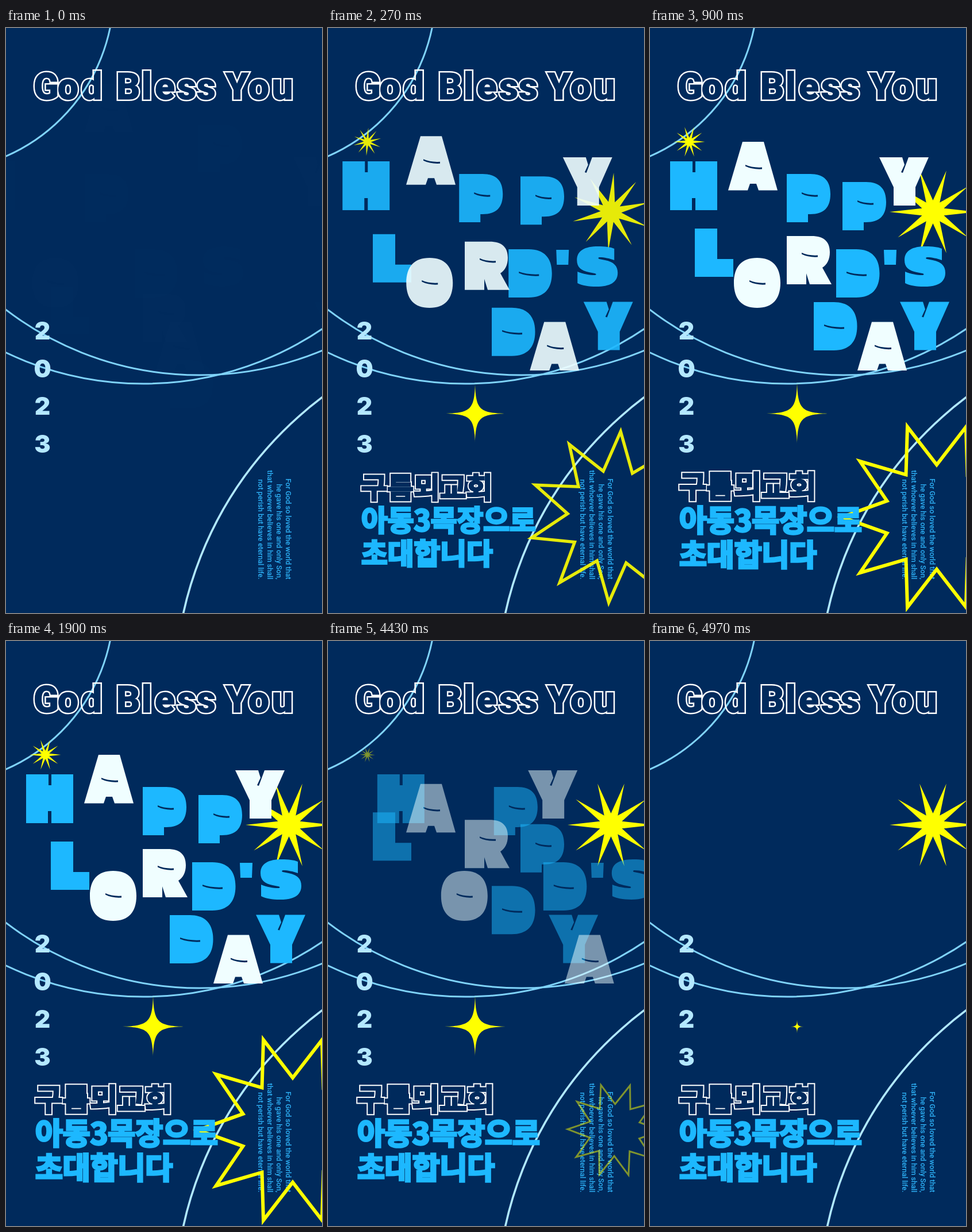
Write an HTML page that moves like this. It is 550 px wide and 1018 px high and loops after 5010 ms.

```html
<!DOCTYPE html>
<html lang="ko">
<head>
<meta charset="utf-8">
<title>Happy Lord's Day</title>
<style>
  html, body { margin: 0; width: 100%; height: 100%; overflow: hidden; background: #002a5c; }
  svg { display: block; width: 100vw; height: 100vh; }
  .title { font: 900 64px Roboto, "Liberation Sans", sans-serif; }
  .year { font: 900 42.5px Inter, Roboto, sans-serif; fill: #b4e8ff; text-anchor: middle; }
  .verse { font: 500 12.6px Roboto, "Liberation Sans", sans-serif; fill: #2db0f5; text-anchor: end; }
  .hangul { font: 900 52px "Noto Sans CJK KR", "Noto Sans CJK", sans-serif; }
  .bold { fill: #1db8ff; stroke: #1db8ff; stroke-width: 3.6; }
  .outline { fill: none; stroke: #fff; stroke-width: 6; }
  .cut { fill: #000; stroke: #000; stroke-width: 1; }
  .hangul.outline { stroke-width: 6.8; }
  .hangul.cut { stroke-width: 2.8; }
</style>
</head>
<body>
<svg viewBox="0 0 550 1018" preserveAspectRatio="none">
  <defs>
    <mask id="titleCut" maskUnits="userSpaceOnUse" x="0" y="0" width="550" height="1018">
      <rect width="550" height="1018" fill="#fff"/>
      <text class="title cut" y="124" x="48 90 131 172 192 236 259 298 332 367 382 422 463">God Bless You</text>
    </mask>
    <mask id="nameCut" maskUnits="userSpaceOnUse" x="0" y="0" width="550" height="1018">
      <rect width="550" height="1018" fill="#fff"/>
      <text class="hangul cut" x="50.5" y="816.5">구름뫼교회</text>
    </mask>
  </defs>
  <rect width="550" height="1018" fill="#002a5c"/>

  <g fill="none" stroke="#7fd3f9" stroke-width="3">
    <circle cx="-124.5" cy="-63" r="312"/>
    <circle cx="336.5" cy="49" r="555"/>
    <circle cx="239" cy="64" r="555"/>
    <circle cx="934" cy="1155" r="640" stroke="#b0e8ff" stroke-width="3.6"/>
  </g>

  <text class="title outline" mask="url(#titleCut)" y="124" x="48 90 131 172 192 236 259 298 332 367 382 422 463">God Bless You</text>

  <g class="year">
    <text x="63.5" y="542">2</text>
    <text x="63.5" y="608">0</text>
    <text x="63.5" y="673">2</text>
    <text x="63.5" y="738.5">3</text>
  </g>

  <g class="verse" transform="rotate(90)">
    <text x="959.5" y="-486.5">For God so loved the world that</text>
    <text x="959.5" y="-471">he gave his one and only Son,</text>
    <text x="959.5" y="-455">that whoever believes in him shall</text>
    <text x="959.5" y="-439">not perish but have eternal life.</text>
  </g>

  <path id="smallStar" fill="#ff0"/>
  <path id="bigStar" fill="#ff0"/>
  <path id="burst" fill="none" stroke="#ff0" stroke-width="6" stroke-miterlimit="8"/>
  <path id="spark" fill="#ff0" d="M0-53C1.5-8 8-1.5 53 0C8 1.5 1.5 8 0 53C-1.5 8-8 1.5-53 0C-8-1.5-1.5-8 0-53Z"/>
  <g id="letters" role="img" aria-label="Happy Lord's Day" fill-rule="evenodd"></g>

  <g id="invite">
    <text class="hangul outline" mask="url(#nameCut)" x="50.5" y="816.5">구름뫼교회</text>
    <text class="hangul bold" x="51" y="876">아동3목장으로</text>
    <text class="hangul bold" x="51" y="936">초대합니다</text>
  </g>
</svg>
<script>
const LOOP = 5010;
const BLUE = '#1db8ff', WHITE = '#f0feff';
const $ = id => document.getElementById(id);
const clamp = v => Math.max(0, Math.min(1, v));

function starPath(outer, inner, points = 10) {
  let d = '';
  for (let i = 0; i < points * 2; i++) {
    const a = i * Math.PI / points, r = i % 2 ? inner : outer;
    d += (i ? 'L' : 'M') + (r * Math.cos(a)).toFixed(2) + ' ' + (r * Math.sin(a)).toFixed(2);
  }
  return d + 'Z';
}

// Thin curved cut that stands in for a letter's counter.
const slit = (x, y, w) => `M${x} ${y}q${w * 0.42} 5.5 ${w} 4.5v3q${-w * 0.58} 1 ${-w}-5z`;

// Glyph shapes, each from its own top left corner.
const glyphs = {
  H: 'M0 0H39V19H44V0H82V85H44V64H38V85H0Z',
  A: 'M25 0H62L86 84.5H53L49 73H38L34 84.5H0Z' + slit(30, 40, 29),
  P: 'M0 0H41C65 0 76 12 76 35C76 58 65 70 41 70H37V84H0Z' + slit(26, 32, 28),
  Y: 'M0 0H40L44 13L38 26L41 27L51 0H86L63 52V84H25V52Z',
  L: 'M0 0H39V53H67V84H0Z',
  O: 'M40.5 0C67 0 81 15 81 43.5S67 87 40.5 87S0 72 0 43.5S14 0 40.5 0Z' + slit(27, 39, 28),
  R: 'M0 0H43C65 0 75 10 75 28C75 41 70 50 62 55L78 84H40L34 65V84H0Z' + slit(26, 29, 28),
  D: 'M0 0H35C62 0 75.5 15 75.5 42S62 84 35 84H0Z' + slit(18, 39, 35),
  "'": 'M0 0H22L21 26H1Z',
  S: 'M65 4V24C57 21 47 19 40 19C37 19 36 21 39 22L49 24C64 27 71 34 71 46C71 63 57 70 34 70C20 70 9 68 1 64V44C11 48 22 50 30 50C34 50 35 48 31 47L21 45C7 42 0 36 0 24C0 7 14 0 37 0C49 0 58 1 65 4Z'
};

// glyph, colour, x, y, travel direction
const layout = [
  ['H', BLUE, 35, 232, 1, 0],
  ['P', BLUE, 238, 254, 1, 0],
  ['P', BLUE, 335, 268, 0, 1],
  ['L', BLUE, 78, 349, 0, -1],
  ['D', BLUE, 324, 385, 1, 0],
  ["'", BLUE, 407, 386, 1, 0],
  ['S', BLUE, 443, 380, 1, 0],
  ['D', BLUE, 285, 477, 0, -1],
  ['Y', BLUE, 435, 476.5, -1, 0],
  ['A', WHITE, 136, 198, 0, 1],
  ['Y', WHITE, 399, 225, -1, 0],
  ['O', WHITE, 146, 400, 1, 0],
  ['R', WHITE, 238, 362, 0, -1],
  ['A', WHITE, 361, 511.5, 1, 0]
];

const letters = layout.map(([glyph, fill, x, y, dx, dy]) => {
  const el = document.createElementNS('http://www.w3.org/2000/svg', 'path');
  el.setAttribute('d', glyphs[glyph]);
  el.setAttribute('fill', fill);
  $('letters').append(el);
  return { el, x, y, dx, dy };
});

$('smallStar').setAttribute('d', starPath(27, 7));
$('bigStar').setAttribute('d', starPath(75.5, 20));
$('burst').setAttribute('d', starPath(165, 91));

function place(el, transform, opacity = 1) {
  el.setAttribute('transform', transform);
  el.setAttribute('opacity', opacity);
}

function spin(id, x, y, u) {
  const s = 1 - Math.abs(u);
  place($(id), `translate(${x} ${y}) rotate(${180 + 145 * u}) scale(${s})`, s);
}

// Scale that swells past 1 before it reaches 0 at q = 1.
const pop = q => 1 - 3 * q ** 3 + 2 * q * q;

function draw(t) {
  const enter = clamp(t / 300) - 1;
  const leave = clamp((t - 4274) / 312);
  const u = enter + leave;

  for (const { el, x, y, dx, dy } of letters)
    place(el, `translate(${x + dx * 101 * u} ${y + dy * 101 * u})`, 1 - Math.abs(u));

  spin('smallStar', 68.5, 198, u);
  spin('bigStar', 492.5, 320, enter);
  spin('burst', 499, 851, u);

  const grow = pop(1 - clamp((t - 180) / 300));
  const shrink = pop(clamp((t - 4685) / 300));
  place($('spark'), `translate(256 671) scale(${grow * shrink})`);
  place($('invite'), `translate(212 858) scale(${grow}) translate(-212 -858)`);
}

const start = performance.now();
function tick() {
  draw((performance.now() - start) % LOOP);
  requestAnimationFrame(tick);
}
draw(0);
requestAnimationFrame(tick);
</script>
</body>
</html>
```
